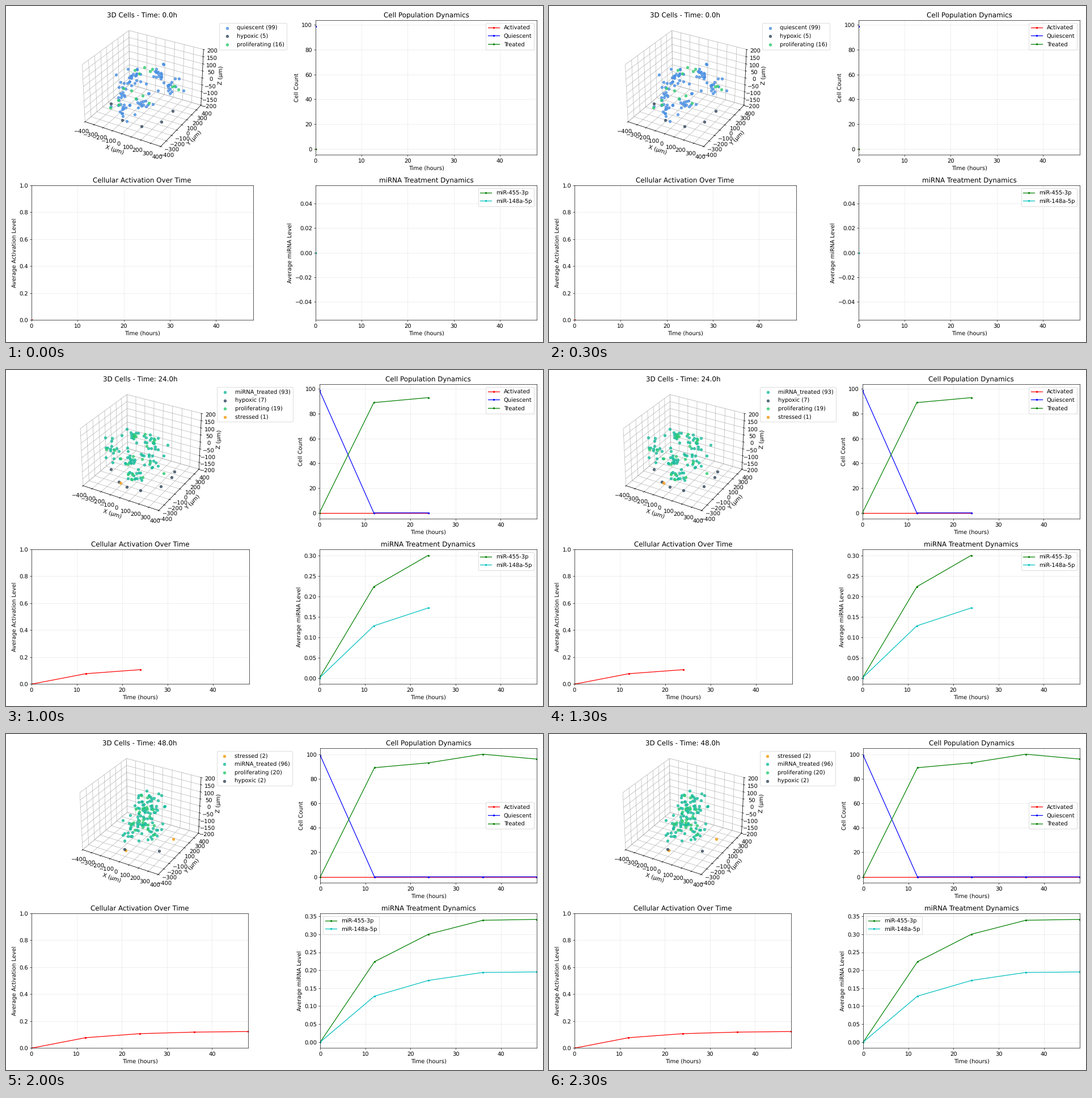
Animation of 947 by 592 pixels, one loop 2500 ms. Source, as a matplotlib script:

```python
import numpy as np
import matplotlib.pyplot as plt
from matplotlib.animation import FuncAnimation

W, H, DPI = 947, 592, 59.2
plt.rcParams.update({"font.family": "DejaVu Sans", "font.size": 12,
                     "text.hinting": "none"})

COLORS = {
    "quiescent": "#4A90E2",
    "hypoxic": "#34495E",
    "proliferating": "#2ECC71",
    "miRNA_treated": "#1ABC9C",
    "stressed": "#F39C12",
}

# Panel geometry in pixels; the width follows the space the legend needs
LEFT, RIGHT = 44.9, 936.4
TOPS, PANEL_H = (24.8, 315.8), 237.7
WIDTHS = (390.7, 384.8, 383.7, 380.0, 382.2)

# Cells per state, in legend order
COUNTS = [
    dict(quiescent=99, hypoxic=5, proliferating=16),
    dict(miRNA_treated=89, hypoxic=10, proliferating=20, stressed=1),
    dict(miRNA_treated=93, hypoxic=7, proliferating=19, stressed=1),
    dict(miRNA_treated=100, hypoxic=4, proliferating=15, stressed=1),
    dict(stressed=2, miRNA_treated=96, proliferating=20, hypoxic=2),
]

# Pixel centres around which the cells gather
HUBS = [
    [(207, 143), (229, 119), (241, 168), (267, 116), (291, 142), (204, 180)],
    [(199, 114), (204, 144), (244, 119), (243, 150), (284, 158), (238, 186)],
    [(223, 114), (262, 127), (188, 142), (255, 162), (219, 162), (228, 187)],
    [(267, 116), (235, 139), (288, 145), (210, 172), (232, 178), (255, 172)],
    [(248, 114), (257, 131), (238, 137), (238, 157), (220, 170), (257, 172)],
]

STEP = np.arange(5)
HOURS = STEP * 12
ACTIVATED, QUIESCENT, TREATED = (
    [c.get(state, 0) for c in COUNTS]
    for state in ("activated", "quiescent", "miRNA_treated"))
ACTIVATION = 0.126 * (1 - 0.385 ** STEP)
MIR_455 = np.array([0, 0.2235, 0.3003, 0.339, 0.3415])
MIR_148 = MIR_455 * 4 / 7

fig = plt.figure(figsize=((W + 1e-6) / DPI, (H + 1e-6) / DPI), dpi=DPI)


def panel(row, col, width, **kw):
    x = LEFT if col == 0 else RIGHT - width
    y = H - TOPS[row] - PANEL_H
    return fig.add_axes([x / W, y / H, width / W, PANEL_H / H], **kw)


def near_hubs(rng, hubs, n):
    """Scatter n cells around the hubs, some tightly and some loosely."""
    spread = rng.choice([5, 8, 13], (n, 1))
    offset = np.clip(rng.normal(size=(n, 2)), -1.8, 1.8)
    start = rng.integers(len(hubs))
    return np.array(hubs)[(start + np.arange(n)) % len(hubs)] + offset * spread


def on_rim(rng, n):
    """Spread n cells along the lower rim of the cloud."""
    angle = np.pi * (np.arange(n) + rng.uniform(0.2, 0.8, n)) / n
    return np.c_[242 + 58 * np.cos(angle), 165 + 47 * np.sin(angle)]


def draw_cells(i, width):
    ax = panel(0, 0, width, projection="3d")
    ax.set(xlim=(-400, 400), ylim=(-400, 400), zlim=(-200, 200),
           xlabel="X (µm)", ylabel="Y (µm)", zlabel="Z (µm)",
           title=f"3D Cells - Time: {HOURS[i]:.1f}h")
    for axis in (ax.xaxis, ax.yaxis, ax.zaxis):
        axis.pane.fill = False

    layer = fig.add_axes([0, 0, 1, 1])
    layer.set(xlim=(0, W), ylim=(H, 0))
    layer.axis("off")
    rng = np.random.default_rng(40 + i)
    handles = []
    for state, n in COUNTS[i].items():
        rare = state in ("hypoxic", "stressed")
        xy = on_rim(rng, n) if rare else near_hubs(rng, HUBS[i], n)
        handles.append(layer.scatter(*xy.T, s=30, c=COLORS[state], alpha=0.8,
                                     label=f"{state} ({n})"))
    ax.legend(handles=handles, bbox_to_anchor=(1.05, 1), loc="upper left")


def draw_lines(ax, i, series, title, ylabel, loc=None):
    for values, color, label in series:
        ax.plot(HOURS[:i + 1], values[:i + 1], color + "o-", markersize=3, label=label)
    ax.set(xlim=(0, 48), xlabel="Time (hours)", ylabel=ylabel, title=title)
    ax.grid(True, alpha=0.3)
    if loc:
        ax.legend(loc=loc)


def update(i):
    fig.clear()
    width = WIDTHS[i]
    draw_cells(i, width)
    draw_lines(panel(0, 1, width), i,
               [(ACTIVATED, "r", "Activated"), (QUIESCENT, "b", "Quiescent"),
                (TREATED, "g", "Treated")],
               "Cell Population Dynamics", "Cell Count",
               "center right" if i == 4 else "upper right")
    activation = panel(1, 0, width)
    draw_lines(activation, i, [(ACTIVATION, "r", None)],
               "Cellular Activation Over Time", "Average Activation Level")
    activation.set_ylim(0, 1)
    draw_lines(panel(1, 1, width), i,
               [(MIR_455, "g", "miR-455-3p"), (MIR_148, "c", "miR-148a-5p")],
               "miRNA Treatment Dynamics", "Average miRNA Level",
               "upper left" if i >= 3 else "upper right")
    return []


anim = FuncAnimation(fig, update, frames=5, interval=500, repeat=True, repeat_delay=0)
plt.show()
```
